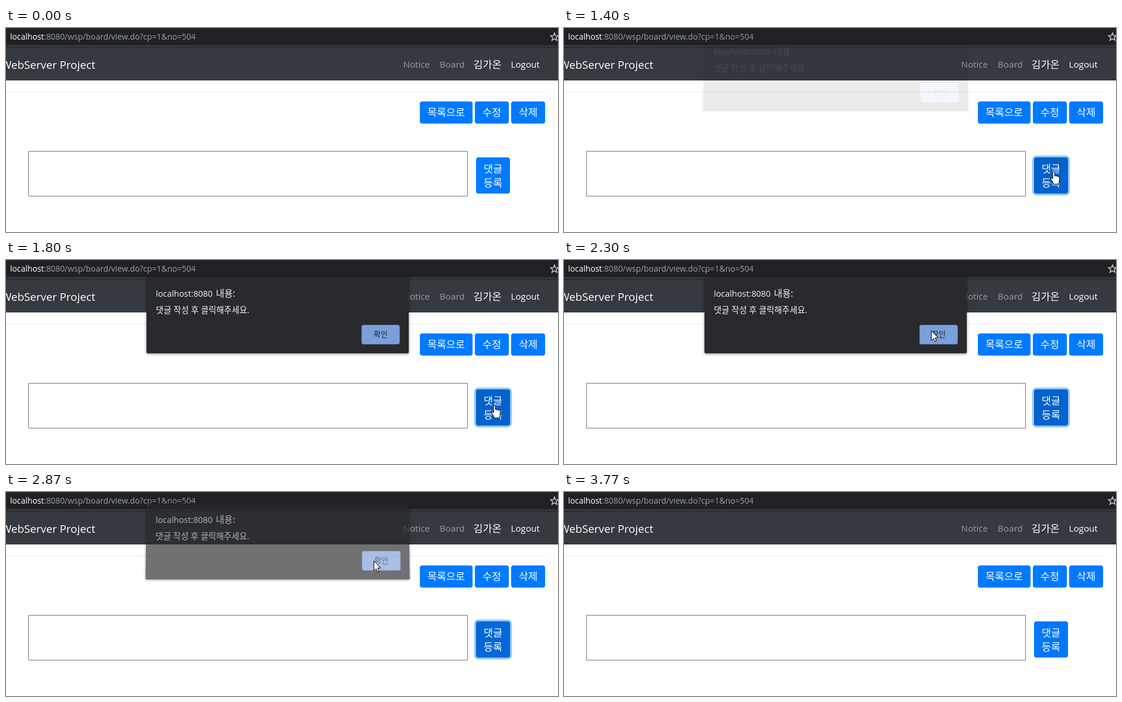
An HTML page with a canvas that plays this animation: 943x350 px, repeating every 3810 ms.

```html
<!DOCTYPE html>
<html lang="ko">
<head>
<meta charset="utf-8">
<title>Comment alert</title>
<style>
  html, body { margin: 0; width: 100%; height: 100%; overflow: hidden; background: #fff; }
  canvas { display: block; }
</style>
</head>
<body>
<canvas id="stage" width="943" height="350"></canvas>
<script>
const LOOP = 3810;
const FONT = '"Open Sans", "Noto Sans CJK KR", "Noto Sans CJK", sans-serif';
const BASE = [0, 123, 255], HOVER = [0, 105, 217], ACTIVE = [0, 98, 204];
const BORDER_HOVER = [0, 98, 204], BORDER_ACTIVE = [0, 92, 191];
const SUBMIT = { x: 803, y: 222, w: 58, h: 62 };
const DIALOG = { x: 240, y: 29, w: 448, h: 131, pad: 8 };

const ctx = document.getElementById('stage').getContext('2d');
const ramp = (t, from, to) => Math.min(1, Math.max(0, (t - from) / (to - from)));
const easeOut = x => 1 - (1 - x) ** 2;
const easeInOut = x => x * x * (3 - 2 * x);
const mix = (a, b, k) => a.map((v, i) => v + (b[i] - v) * k);
const rgb = c => `rgb(${c.map(Math.round).join(',')})`;

function layer(w, h) {
  const c = document.createElement('canvas');
  c.width = w;
  c.height = h;
  return c.getContext('2d');
}

function rect(g, color, x, y, w, h, r = 0) {
  g.fillStyle = color;
  g.beginPath();
  g.roundRect(x, y, w, h, r);
  g.fill();
}

function text(g, str, x, y, size, color, align = 'left') {
  g.font = `${size}px ${FONT}`;
  g.fillStyle = color;
  g.textAlign = align;
  g.fillText(str, x, y);
  return x + g.measureText(str).width;
}

function polygon(points) {
  const path = new Path2D();
  points.forEach(([x, y]) => path.lineTo(x, y));
  path.closePath();
  return path;
}

function drawStar(g, cx, cy, r) {
  const points = Array.from({ length: 10 }, (_, i) => {
    const a = i * Math.PI / 5 - Math.PI / 2;
    const d = i % 2 ? r * 0.45 : r;
    return [cx + d * Math.cos(a), cy + d * Math.sin(a)];
  });
  g.strokeStyle = '#c6c9cd';
  g.lineWidth = 1.5;
  g.stroke(polygon(points));
}

function makePage() {
  const g = layer(943, 350);
  rect(g, '#fff', 0, 0, 943, 350);

  // address bar
  rect(g, '#202124', 0, 0, 943, 29);
  rect(g, '#35363a', 0, 29, 943, 4);
  rect(g, '#242528', 0, 33, 943, 1);
  const hostEnd = text(g, 'localhost', 7, 20, 13.85, '#fff');
  text(g, ':8080/wsp/board/view.do?cp=1&no=504', hostEnd, 20, 13.85, '#9aa0a6');
  drawStar(g, 937, 15.5, 7);

  // navigation
  rect(g, '#343a40', 0, 34, 943, 56);
  text(g, 'WebServer Project', 152.5, 70, 18.75, '#fff', 'right');
  text(g, 'Notice', 678.5, 68, 15.2, '#999c9f');
  text(g, 'Board', 741, 68, 15.2, '#999c9f');
  text(g, '김가온', 798.5, 69, 17.4, '#fff');
  text(g, 'Logout', 862.5, 68, 15.2, '#fff');

  // content
  rect(g, '#e5e5e5', 0, 109, 921, 1);
  let right = 921;
  for (const label of ['삭제', '수정', '목록으로']) {
    const w = 26 + 16 * label.length;
    rect(g, rgb(BASE), right - w, 126, w, 38, 4);
    text(g, label, right - w / 2, 151, 17.4, '#fff', 'center');
    right -= w + 4;
  }
  rect(g, '#767676', 38, 211, 751, 78, 1);
  rect(g, '#fff', 39, 212, 749, 76);
  return g.canvas;
}

function makeDialog() {
  const { x, y, w, h, pad } = DIALOG;
  const g = layer(w + pad * 2, h + pad * 2);
  g.translate(pad - x, pad - y);
  g.shadowColor = 'rgba(0,0,0,.55)';
  g.shadowBlur = 4;
  g.shadowOffsetY = 1;
  rect(g, '#292a2d', x, y, w, h, 2);
  g.shadowColor = 'transparent';
  text(g, 'localhost:8080', 256, 63, 14.4, '#f1f3f4');
  text(g, '내용:', 358.5, 63, 15.7, '#f1f3f4');
  text(g, '댓글 작성 후 클릭해주세요.', 256, 91, 14.3, '#f1f3f4');
  rect(g, '#56709f', 607, 111, 66, 34, 4);
  rect(g, '#7b9fdb', 608, 112, 64, 32, 3);
  text(g, '확인', 640, 132, 13, '#202124', 'center');
  return g.canvas;
}

function makeHand() {
  const hand = new Path2D();
  for (let i = 0; i < 4; i++) {
    const top = i ? 6.2 + i * 0.7 : 0.5;
    hand.roundRect(-1.2 + i * 2.7, top, 2.4, 16 - top, 1.2);
  }
  hand.roundRect(-1.2, 10, 10.2, 11, [0, 0, 3, 3]);
  hand.addPath(polygon([[-5, 12], [-3.6, 11.2], [0, 14.5], [0, 19.5]]));
  return hand;
}

const page = makePage();
const dialog = makeDialog();
const hand = makeHand();
const arrow = polygon([[0, 0], [0, 16.5], [3.8, 13], [6.3, 18.6], [8.8, 17.5], [6.4, 12], [11.6, 11.8]]);

function drawSubmit(t) {
  const { x, y, w, h } = SUBMIT;
  const focus = easeOut(ramp(t, 1265, 1400));
  const press = focus - easeOut(ramp(t, 2740, 2870));
  const blur = easeOut(ramp(t, 3680, 3830));
  const hover = easeOut(ramp(t, 560, 710)) * (1 - blur);
  const ring = focus * (1 - blur);
  if (ring > 0) {
    const d = 3.2 * ring;
    rect(ctx, '#fff', x, y, w, h, 4);
    rect(ctx, `rgba(38,143,255,${0.5 * ring})`, x - d, y - d, w + 2 * d, h + 2 * d, 4 + d);
  }
  rect(ctx, rgb(mix(mix(BASE, BORDER_HOVER, hover), BORDER_ACTIVE, press)), x, y, w, h, 4);
  rect(ctx, rgb(mix(mix(BASE, HOVER, hover), ACTIVE, press)), x + 1, y + 1, w - 2, h - 2, 3);
  ['댓글', '등록'].forEach((line, i) =>
    text(ctx, line, x + w / 2, 248 + 24 * i, 17.4, '#fff', 'center'));
}

// The window tips towards the viewer while it slides and fades.
function drawDialog(t) {
  if (t < 1390 || t >= 2990) return;
  const closing = ramp(t, 2810, 2990);
  const lift = 19 * (1 - easeOut(ramp(t, 1390, 1565))) + 18 * easeOut(closing);
  const { x, y, w, h, pad } = DIALOG;
  const mid = x + w / 2;
  const top = y - pad - Math.round(lift);
  ctx.globalAlpha = ramp(t, 1390, 1510) * (1 - closing);
  if (lift < 0.1) {
    ctx.drawImage(dialog, x - pad, top);
  } else {
    for (let row = 0; row < dialog.height; row++) {
      const scale = 1 + 0.013 * lift / 17 * (row - pad) / h;
      const width = dialog.width * scale;
      ctx.drawImage(dialog, 0, row, dialog.width, 1, mid - width / 2, top + row, width, 1);
    }
  }
  ctx.globalAlpha = 1;
}

// Enter, swing over to the dialog button, nudge up for the click, leave.
function pointerAt(t) {
  const swing = ramp(t, 1770, 2300);
  let spot = mix([919, 300], [836, 246], easeOut(ramp(t, 370, 800)));
  spot = mix(spot, [627, 121], easeInOut(swing));
  spot[1] += 12 * Math.sin(2 * Math.PI * swing) - 4 * ramp(t, 2600, 2830);
  return mix(spot, [833, 277], ramp(t, 2870, 3090)).map(Math.round);
}

function drawPointer(t) {
  if (t < 370 || t >= 3090) return;
  const [px, py] = pointerAt(t);
  const { x, y, w, h } = SUBMIT;
  const onButton = px >= x && px < x + w && py >= y && py < y + h;
  const shape = onButton ? hand : arrow;
  ctx.save();
  ctx.translate(px + 0.5, py + 0.5);
  ctx.lineJoin = 'round';
  ctx.lineWidth = onButton ? 2 : 1;
  ctx.strokeStyle = '#000';
  ctx.fillStyle = '#fff';
  if (onButton) ctx.stroke(shape);
  ctx.fill(shape);
  if (!onButton) ctx.stroke(shape);
  ctx.restore();
}

const start = performance.now();
function frame() {
  const t = (performance.now() - start) % LOOP;
  ctx.drawImage(page, 0, 0);
  drawSubmit(t);
  drawDialog(t);
  drawPointer(t);
  requestAnimationFrame(frame);
}
frame();
</script>
</body>
</html>
```
